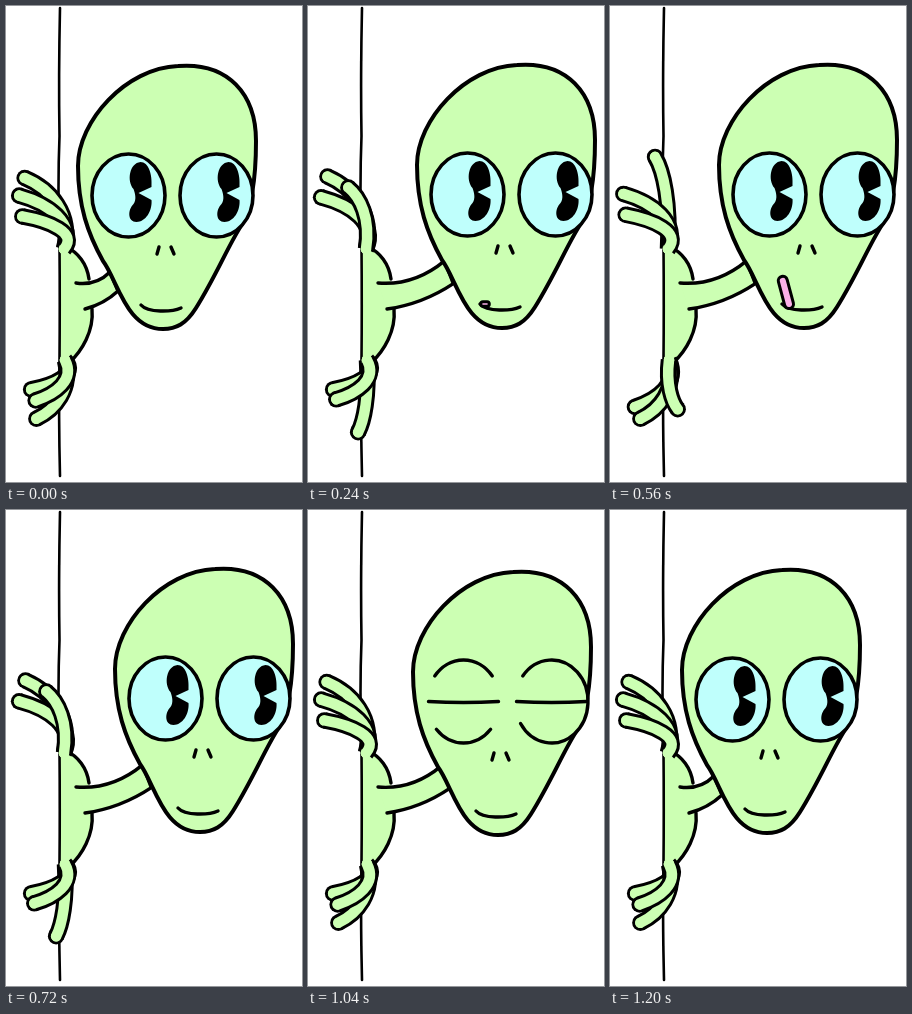
Recreate the animation shown at these times as an HTML page. Size 296 by 476 pixels, loop 1620 ms.

```html
<!DOCTYPE html>
<html>
<head>
<meta charset="utf-8">
<style>
html, body { margin: 0; width: 100%; height: 100%; overflow: hidden; background: #fff; }
svg { display: block; width: 296px; height: 476px; }
</style>
</head>
<body>
<svg viewBox="0 0 296 476" fill="none" stroke-linecap="round" stroke-linejoin="round">
  <g id="body"></g>
  <path d="M54 2 Q52.500 70 53.500 130 Q51.500 180 53.500 240 Q54 300 53.500 355 Q52.500 410 54 470" stroke="#000" stroke-width="2.600"/>
  <g id="hands"></g>
  <g id="head"></g>
</svg>
<script>
const GREEN = '#ccffb3', CYAN = '#bffffc', PINK = '#fbb0e8';
const LOOP = 1620, STEP = 80, LAST = 15;
const EYE = { rx: 36.5, ry: 41.5, y: 189.5, left: 122.5, right: 210.5 };
const byId = id => document.getElementById(id);

const shape = (d, fill = 'none', w = 3.4) => `<path d="${d}" fill="${fill}" stroke="#000" stroke-width="${w}"/>`;
const tube = (d, color, w, cap) =>
  `<path d="${d}" stroke="#000" stroke-width="${w + 6}" stroke-linecap="${cap}"/>` +
  `<path d="${d}" stroke="${color}" stroke-width="${w}"/>`;
const rad = deg => deg * Math.PI / 180;

// Finger angles in degrees from straight along the wall, positive to the left
const upper = { rest: [29, 40, 52], tuck: [28, 41, 16], fan: [-15, 4, 20], spread: [-13, 9, 52], tap: [8, 39, 51] };
const lower = { rest: [49, 26, 36], tuck: [7, 49, 38], fan: [6, -34, 1], spread: [29, -52, -6], tap: [36, 26, -10] };
const drumming = ['tuck', 'tuck fan', 'fan', 'spread', 'tap', 'rest', 'tuck', 'fan', 'spread', 'tap'];

// Fingers get shorter the further they bend; the third one is short anyway
function finger(x, y, scale, angle, i) {
  const reach = Math.min(i === 2 ? 64 : 94, 94 - 0.0152 * angle ** 2);
  const dx = -Math.sin(rad(angle)) * reach * Math.abs(scale);
  const dy = -Math.cos(rad(angle)) * reach * scale;
  const bulge = 18 * Math.sin(rad(angle));
  const d = `M${x} ${y} C${x + bulge} ${y + dy / 2} ${x + dx * 0.35} ${y + dy * 0.85} ${x + dx} ${y + dy}`;
  const tip = `M${x + dx} ${y + dy} l0 0.01`;
  return tube(tip, GREEN, 10.5, 'round') + tube(d, GREEN, 10.5, 'butt');
}

function hand(angles, pose, x, y, scale) {
  const [a, b = a] = pose.split(' ').map(name => angles[name]);
  return a.map((angle, i) => finger(x, y, scale, (angle + b[i]) / 2, i)).join('');
}

// The neck stretches with the head's shift
function body(shift) {
  const ux = 104 + 0.88 * shift, uy = 266 - 0.3 * shift;
  const lx = 112 + 0.9 * shift, ly = 285 - 0.2 * shift;
  return `<path d="M54 240 H61 C73 247 82 260 83 277 L86 303 C88 325 76 345 63 357 H54Z" fill="${GREEN}"/>` +
    shape('M60 241 C72 246 81 258 83 273') + shape('M86 303 C88 325 76 345 63 357') +
    shape(`M70 277 Q${(70 + ux) / 2 + 3} 280 ${ux} ${uy} L${lx} ${ly} Q${(84 + lx) / 2} 298 79 303`, GREEN);
}

function openEye(x) {
  const px = x + 12, py = EYE.y - 3.5;
  return `<ellipse cx="${x}" cy="${EYE.y}" rx="${EYE.rx}" ry="${EYE.ry}" fill="${CYAN}" stroke="#000" stroke-width="3.600"/>` +
    `<path transform="translate(${px} ${py})" fill="#000" d="M0 -30 C8 -30 12 -18 11 -5 L-2 1 L11 8
      C12 19 5 30 -4 30 C-13 30 -13 18 -7 12 C-4 8 -5 2 -7 -3 C-14 -11 -11 -29 0 -30Z"/>`;
}

function rim(x, from, to, fill) {
  const at = deg => `${x + EYE.rx * Math.cos(rad(deg))} ${EYE.y + EYE.ry * Math.sin(rad(deg))}`;
  return shape(`M${at(from)} A${EYE.rx} ${EYE.ry} 0 ${to - from > 180 ? 1 : 0} 1 ${at(to)}`, fill);
}

function closedEyes() {
  const lid = x => shape(`M${x - 35} ${EYE.y} q35 2 70 0`);
  return rim(EYE.left, 218, 322) + rim(EYE.left, 42, 138) +
    rim(EYE.right, -142, 148, GREEN) + lid(EYE.left) + lid(EYE.right);
}

// Comes out sideways, then swings up
function tongue(step) {
  if (step < 3 || step > 7) return '';
  const length = Math.min(24, 4 + 7 * (step - 3));
  const angle = rad(75 * Math.max(0, (step - 5) / 2));
  const x = 142 - length * Math.cos(angle), y = 299 - length * Math.sin(angle);
  return tube(`M142 299 L${x} ${y}`, PINK, Math.min(6, length * 0.4), 'round');
}

function head(step, blink) {
  return shape(`M172 60 C222 56 250 88 250 135 C250 165 247 200 235 220 C222 240 210 270 190 302
    C180 318 170 323 157 323 C120 323 112 275 97 255 C82 228 72 200 72 160 C72 115 120 62 172 60Z`, GREEN, 4) +
    (blink ? closedEyes() : openEye(EYE.left) + openEye(EYE.right)) +
    shape('M153 241 l-2 7 M165 241 l3 7') +
    shape('M135 299 C142 307 166 306 175 302') + tongue(step);
}

let shown = -1;
function draw(step) {
  if (step === shown) return;
  shown = step;
  const rest = step === 0 || step === LAST;
  const blink = !rest && (step === 1 || step >= 13);
  const shift = rest ? 0 : blink ? 33 : 37;
  const pose = drumming[step - 3] || 'rest';
  byId('body').innerHTML = body(shift);
  byId('hands').innerHTML = hand(upper, pose, 58, 243, 1) + hand(lower, pose, 59, 354, -0.78);
  byId('head').setAttribute('transform', `translate(${shift} ${blink ? 2 : rest ? 0 : -1})`);
  byId('head').innerHTML = head(step, blink);
}

const start = performance.now();
function tick() {
  const t = (performance.now() - start) % LOOP;
  draw(Math.min(LAST, Math.floor(t / STEP)));
  requestAnimationFrame(tick);
}
tick();
</script>
</body>
</html>
```
